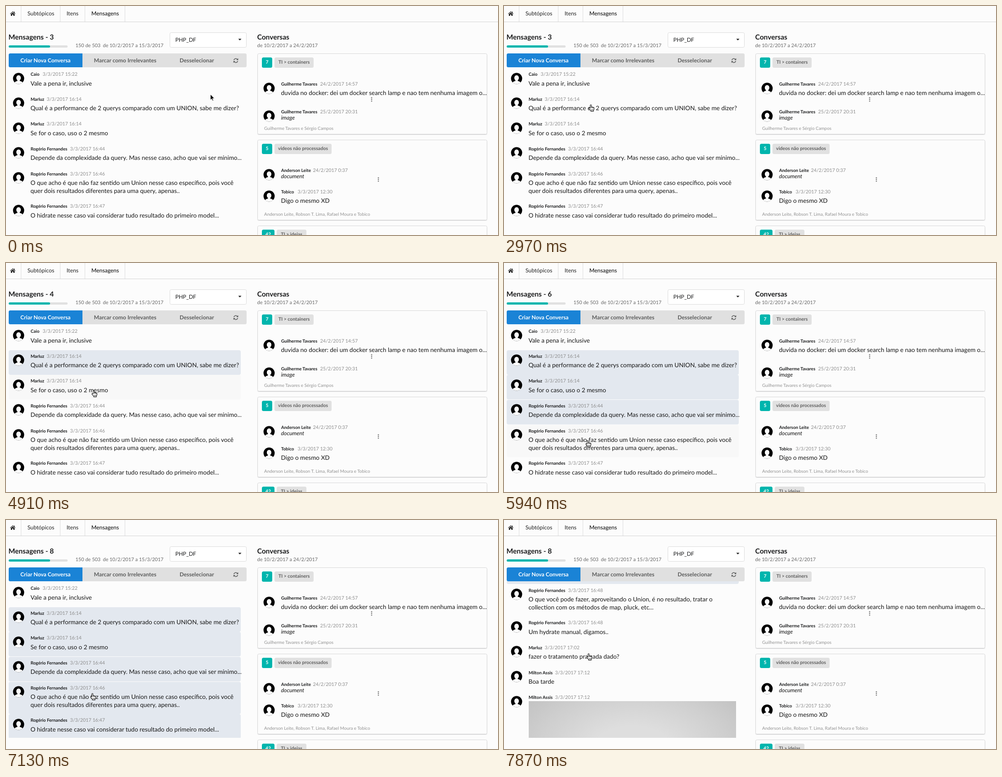
These frames come from a looping animation (1094x512 px, 8 s). An HTML page:

```html
<!DOCTYPE html>
<html lang="pt">
<head>
<meta charset="utf-8">
<title>Mensagens</title>
<style>
html, body { margin: 0; width: 100%; height: 100%; overflow: hidden; background: #fcfcfc; }
body { font: 12.35px/20px Lato, "Open Sans", sans-serif; color: #1b1c1d; position: relative; text-rendering: geometricPrecision; }
#stage { position: absolute; left: 0; top: 0; width: 1094px; height: 512px; overflow: hidden; }
#stage div, #stage span, #stage svg { position: absolute; box-sizing: border-box; }
#stage span { white-space: pre; }
svg { overflow: visible; }
.nav { color: #222; }
.on { color: #000; }
.title { font-size: 15.6px; font-weight: 700; }
.meta { font-size: 10.97px; color: #666; }
.name { font-size: 9.86px; font-weight: 700; }
.date { font-size: 10.75px; color: #8c8c8c; }
.text { font-size: 13.52px; color: #161616; }
.kind { font-style: italic; color: #161616; }
.who { font-size: 9.86px; color: #929292; }
.btn { font-size: 12.25px; font-weight: 700; color: #5c5d5d; text-align: center; line-height: 31px; }
.label { font-size: 10.56px; font-weight: 700; text-align: center; line-height: 23px; border-radius: 3.5px; }
.teal { background: #00b5ad; color: #fff; }
.grey { background: #e1e1e1; color: #5f5f5f; }
.card { border: 1px solid #d6d6d7; border-radius: 3.5px; box-shadow: 0 1px 1px #d4d4d5; }
.line { background: #dcdcdd; }
.bg { border-radius: 4px; }
</style>
</head>
<body>
<div id="stage"></div>
<script>
const stage = document.getElementById('stage');

function box(parent, x, y, w, h, cls = '', style = '', text = '') {
  const el = document.createElement('div');
  el.className = cls;
  el.style.cssText = `left:${x}px;top:${y}px;width:${w}px;height:${h}px;${style}`;
  el.textContent = text;
  parent.append(el);
  return el;
}

// y is the middle of the line
function put(parent, x, y, cls, text) {
  const el = document.createElement('span');
  el.className = cls;
  el.style.cssText = `left:${x}px;top:${y - 10}px`;
  el.textContent = text;
  parent.append(el);
  return el;
}

function icon(parent, x, y, shapes) {
  const el = document.createElementNS('http://www.w3.org/2000/svg', 'svg');
  el.setAttribute('width', 1);
  el.setAttribute('height', 1);
  el.style.cssText = `left:${x}px;top:${y}px`;
  el.innerHTML = shapes;
  parent.append(el);
  return el;
}

const avatar = (parent, x, y) => icon(parent, x, y, `
  <circle r="12.4"/>
  <ellipse cy="-1.2" rx="5.1" ry="6" fill="#fcfcfc"/>
  <path d="M-2.6 3H2.6V5.5C6 6.3 8.2 7.4 8.6 9A12.4 12.4 0 0 1-8.6 9C-8.2 7.4-6 6.3-2.6 5.5Z" fill="#fcfcfc"/>`);

const dots = (x, y) => icon(stage, x, y,
  [-3.8, 0, 3.8].map(d => `<circle cy="${d}" r="1.4" fill="#868686"/>`).join(''));

// Navigation
box(stage, 0, 34.5, 1094, 1.5, 'line', 'background:#d2d2d3');
[33, 120, 175, 264].forEach(x => box(stage, x, 0, 1, 35, 'line'));
icon(stage, 14.5, 16.5, '<path d="M-6 .2L0-5 2.6-2.8V-4.4H4.2V-1.4L6 .2 5.2 1.1 0-3.4-5.2 1.1ZM-4.2 1.3L0-2.3 4.2 1.3V5H1.2V2H-1.2V5H-4.2Z" fill="#222"/>');
put(stage, 47.7, 16.5, 'nav', 'Subtópicos');
put(stage, 134.8, 16.5, 'nav', 'Itens');
put(stage, 189.8, 16.5, 'on', 'Mensagens');

// Left column header
const heading = put(stage, 5.5, 69.5, 'title', '');
box(stage, 6, 88, 131, 5, '', 'background:#e1e1e1;border-radius:3px');
box(stage, 6, 88, 92, 5, 'teal', 'border-radius:3px');
put(stage, 154.5, 89.3, 'meta', '150 de 503');
put(stage, 215.5, 89.3, 'meta', 'de 10/2/2017 a 15/3/2017');
box(stage, 364, 59, 171, 34, '', 'background:#fff;border:1px solid #dadada;border-radius:3.5px');
put(stage, 376.5, 76, '', 'PHP_DF');
icon(stage, 520, 74.5, '<path d="M-3.5-1.8H3.5L0 2Z" fill="#222"/>');

// Messages
const list = box(stage, 0, 137, 535, 350, '', 'overflow:hidden');
const track = box(list, 0, -137, 535, 1000);
const DEV = 'Rogério Fernandes';
const messages = [
  ['Caio', 82, '3/3/2017 15:22', 'Vale a pena ir, inclusive'],
  ['Marluz', 91, '3/3/2017 16:14', 'Qual é a performance de 2 querys comparado com um UNION, sabe me dizer?'],
  ['Marluz', 91, '3/3/2017 16:14', 'Se for o caso, uso o 2 mesmo'],
  [DEV, 143, '3/3/2017 16:44', 'Depende da complexidade da query. Mas nesse caso, acho que vai ser mínimo...'],
  [DEV, 143, '3/3/2017 16:46', 'O que acho é que não faz sentido um Union nesse caso específico, pois você',
    'quer dois resultados diferentes para uma query, apenas..'],
  [DEV, 143, '3/3/2017 16:47', 'O hidrate nesse caso vai considerar tudo resultado do primeiro model...'],
  [DEV, 143, '3/3/2017 16:48', 'O que você pode fazer, aproveitando o Union, é no resultado, tratar o',
    'collection com os métodos de map, pluck, etc...'],
  [DEV, 143, '3/3/2017 16:48', 'Um hydrate manual, digamos..'],
  ['Marluz', 91, '3/3/2017 17:02', 'fazer o tratamento pra cada dado?'],
  ['Milton Assis', 114, '3/3/2017 17:12', 'Boa tarde'],
  ['Milton Assis', 114, '3/3/2017 17:12']
];
let rowTop = 139.2;
const rows = messages.map(([name, dateX, date, ...lines]) => {
  const h = lines.length > 1 ? 72.6 : 55.6;
  const bg = box(track, 6, rowTop, 516, h - 0.5, 'bg');
  avatar(track, 27.5, rowTop + 22.4);
  put(track, 54.7, rowTop + 14, 'name', name);
  put(track, dateX - 0.5, rowTop + 14, 'date', date);
  lines.forEach((s, i) => put(track, 54.5, rowTop + 33.3 + i * 17.6, 'text', s));
  if (!lines.length) {
    box(track, 55, rowTop + 21.6, 461, 200, '',
      'background:radial-gradient(ellipse 300px 180px at 50% 110px,#dedede 30%,#cfcfcf 70%,#c2c2c2)');
  }
  rowTop += h;
  return bg;
});

// Button bar
box(stage, 6, 106, 528.5, 31, '', 'background:#e0e0e0;border-radius:3.5px');
box(stage, 6, 106, 163.5, 31, 'btn', 'background:#1a83d6;color:#fff;border-radius:3.5px 0 0 3.5px', 'Criar Nova Conversa');
box(stage, 169, 106, 192, 31, 'btn', '', 'Marcar como Irrelevantes');
box(stage, 361, 106, 126.5, 31, 'btn', '', 'Desselecionar');
icon(stage, 511, 121.5, `<g fill="none" stroke="#5c5d5d" stroke-width="1.6">
  <path d="M-4.4-.9A4.5 4.5 0 0 1 3.3-3"/><path d="M4.4 .9A4.5 4.5 0 0 1-3.3 3"/></g>
  <path d="M5.3-5.2V-1H1.1ZM-5.3 5.2V1H-1.1Z" fill="#5c5d5d"/>`);

// Conversations
put(stage, 558.5, 69.5, 'title', 'Conversas');
put(stage, 558.5, 89.3, 'meta', 'de 10/2/2017 a 24/2/2017');

function card(y, h, count, countW, tag, tagW, who) {
  box(stage, 559, y, 511, h, 'card');
  box(stage, 569, y + 9, countW, 23, 'label teal', '', count);
  box(stage, 574 + countW, y + 9, tagW, 23, 'label grey', '', tag);
  if (who) put(stage, 574, y + h - 13.5, 'who', who);
}

function post(y, name, dateX, date, text, kind) {
  avatar(stage, 584.5, y + 9.5);
  put(stage, 611.7, y, 'name', name);
  put(stage, dateX - 0.5, y, 'date', date);
  put(stage, 611.5, y + (kind ? 13.7 : 19), kind ? 'kind' : 'text', text);
}

card(106, 181, '7', 23, 'TI > containers', 87, 'Guilherme Tavares e Sérgio Campos');
post(174.5, 'Guilherme Tavares', 699, '24/2/2017 14:57', 'duvida no docker: dei um docker search lamp e nao tem nenhuma imagem o...');
dots(813, 209);
post(236.5, 'Guilherme Tavares', 699, '25/2/2017 20:31', 'image', true);
card(299, 180, '5', 23, 'videos não processados', 127, 'Anderson Leite, Robson T. Lima, Rafael Moura e Tobico');
post(367.5, 'Anderson Leite', 683, '24/2/2017 0:37', 'document', true);
dots(828, 388);
post(415.5, 'Tobico', 649, '3/3/2017 12:30', 'Digo o mesmo XD');
card(491, 60, '42', 28, 'TI > ideias', 66);

// Pointers
const arrow = icon(stage, 454, 197, '<path d="M.5.5V13.2L3.4 10.5 5.4 15.1 7.4 14.2 5.4 9.8H9.4Z" stroke="#fff" stroke-width=".9"/>');
const hand = icon(stage, 0, 0, `<path d="M3.8 8.8V2a1.3 1.3 0 0 1 2.6 0V6.2a1.2 1.2 0 0 1 2.2.3 1.1 1.1 0 0 1 2 .5 1 1 0 0 1 1.7.8V10.8L11 13.5V15.4H5V13.6L1 9.3A1.2 1.2 0 0 1 2.7 7.7Z" fill="#fff" stroke="#111" stroke-width="1.1" stroke-linejoin="round"/>
  <path d="M6.4 6.2V8.6M8.6 6.7V8.8M10.6 7.2V9M6.5 11V13.5M8.3 11V13.5M10 11V13.5" fill="none" stroke="#111" stroke-width=".8"/>`);

// Each step holds until the next: [ms, ...values]
const LOOP = 8000;
const pointer = [
  [440, 445, 206], [587, 410, 222], [734, 355, 234], [881, 300, 237],
  [1029, 245, 230], [1176, 205, 215], [1323, 182, 198], [1470, 172, 185],
  [2820, 178, 199], [2965, 188, 220], [3110, 192, 230],
  [4460, 192, 243], [4610, 190, 279],
  [4910, 190, 284], [5055, 189, 312], [5200, 188, 343],
  [5500, 187, 346], [5650, 185, 364], [5795, 183, 386], [5940, 181, 396],
  [6390, 182, 400], [6535, 183, 430], [6680, 184, 452],
  [7130, 187, 387], [7270, 189, 376], [7420, 189, 357],
  [7570, 187, 334], [7720, 185, 312], [7870, 183, 298]
];
const hover = [[0, -1], [4610, 2], [5200, 3], [5940, 4], [6680, 5], [7130, -1]];
const scroll = [[0, 0], [7270, 164.5], [7420, 244], [7570, 298], [7720, 330], [7870, 346]];
const picks = [4460, 5055, 5650, 6535, 6980];

const at = (steps, t) => steps.filter(s => s[0] <= t).pop();

function draw(t) {
  const p = at(pointer, t);
  arrow.style.display = p ? 'none' : '';
  hand.style.display = p ? '' : 'none';
  if (p) hand.style.transform = `translate(${p[1]}px,${p[2]}px)`;

  const picked = picks.filter(ms => ms <= t).length;
  heading.textContent = 'Mensagens - ' + (3 + picked);
  const over = at(hover, t)[1];
  rows.forEach((bg, i) => {
    bg.style.background = i > 0 && i <= picked ? '#e3e8ef' : i === over ? '#f8f8f8' : '';
  });
  track.style.transform = `translateY(${-at(scroll, t)[1]}px)`;
}

const start = performance.now();
function tick() {
  draw((performance.now() - start) % LOOP);
  requestAnimationFrame(tick);
}
draw(0);
requestAnimationFrame(tick);
</script>
</body>
</html>
```
